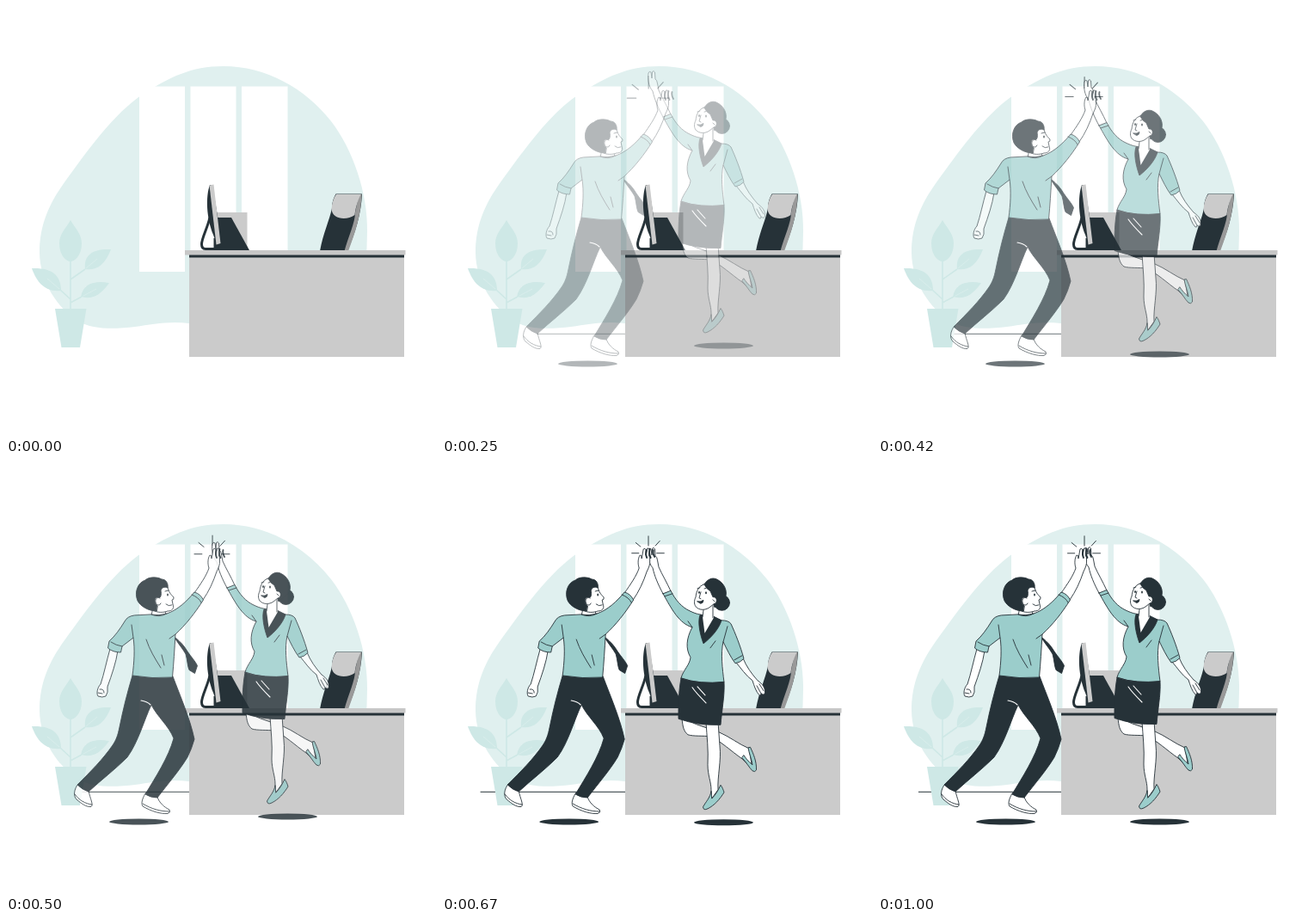
These frames come from a looping animation (500x500 px, 1.04 s). An HTML page:

```html
<!DOCTYPE html>
<html lang="en">
<head>
<meta charset="utf-8">
<title>High five at the office</title>
<style>
  html, body { margin: 0; width: 100%; height: 100%; overflow: hidden; background: #fff; }
  svg { display: block; width: 100vw; height: 100vh; }
  .blob { fill: #e0f0ef; }
  .plant { fill: #cee8e6; }
  .stem { fill: none; stroke: #cee8e6; stroke-width: 1.6; }
  .vein { fill: none; stroke: #e0f0ef; stroke-width: .6; }
  .grey { fill: #cbcbcb; }
  .dark { fill: #263238; }
  .white { fill: #fff; }
  .figure { stroke: #263238; stroke-width: .9; stroke-linejoin: round; stroke-linecap: round; }
  .skin { fill: #fff; }
  .teal { fill: #9bcdcb; }
  .line { fill: none; }
  .shine { fill: none; stroke: #fff; stroke-width: 1.1; }
  .plain { stroke: none; }
</style>
</head>
<body>
<svg viewBox="0 0 500 500">
  <!-- room -->
  <path class="blob" d="M253 70C302 70 347 95 378 134C403 166 421 218 420 262L419 300L213 369C190 366 170 370 150 373C125 376 100 376 85 367C60 352 39 320 39 286C39 255 50 230 68 205C95 168 125 125 160 102C190 83 215 70 253 70Z"/>
  <path class="white" d="M155 93.500h53v215.500h-53zM214.500 93.500h53v215.500h-53zM274 93.500h53.500v215.500h-53.500z"/>
  <line id="floor" y1="381.300" x2="213" y2="381.300" stroke="#263238"/>

  <!-- plant -->
  <path class="stem" d="M75 352V290M92 306L75 318M63 330L75 341M88 338L75 345"/>
  <g class="plant">
    <path d="M57 352H93.500L86 397H64.500Z"/>
    <path d="M75 249C80 258 88 265 88 276C88 290 80 297 75 297C70 297 62 290 62 276C62 265 70 258 75 249Z"/>
    <path d="M122 283C115 302 104 308 92 306C90 290 100 282 122 283Z"/>
    <path d="M30 305C52 304 64 312 64 331C46 333 36 322 30 305Z"/>
    <path d="M120 322C108 339 98 341 87 338C90 322 104 319 120 322Z"/>
  </g>
  <path class="vein" d="M93 305L106 294M62 329L48 317M90 337L105 329"/>

  <!-- chair -->
  <path class="dark" d="M383.500 218.500H414C413 242 406 264 397 285H365C369 263 376 250 379 235C379 228 381 223 383.500 218.500Z"/>
  <path fill="#999" d="M413.500 219C413 242 406 264 398 285H393.500C398 268 406 252 406 240L410.500 219Z"/>
  <path class="grey" d="M384 219H412.500C408 228 406 238 405.500 243C396 250 379 248 378.500 236C379 229 381 223 384 219Z"/>

  <!-- computer -->
  <path class="grey" d="M245 240H280.500V284H245Z"/>
  <path class="dark" d="M246 246H262L283 284H242Z"/>
  <path d="M237 246C234 259 227.500 270 227.500 277Q227.500 282.500 232 282.500H243V270" fill="none" stroke="#263238" stroke-width="3"/>
  <path class="dark" d="M237 208C232 222 233 246 241 266L245 277L247 250L240 208Z"/>
  <path class="grey" d="M236.500 208.500L241.500 207.500L249.500 276L244.500 277.500Z"/>

  <!-- desk -->
  <path class="grey" d="M213 289H463V408H213Z"/>
  <path fill="#c7c7c7" d="M208 284H464.500V289.500H208Z"/>
  <path class="dark" d="M213 289.500H463V292.500H213Z"/>

  <g id="sparks" class="figure">
    <path class="line" d="M240 84V95M225.500 91.500L231 96M221 103.500H229M248 95L253 89.500M249.500 103.500H258"/>
  </g>

  <g id="woman" class="figure">
    <ellipse class="dark plain" cx="327.500" cy="417" rx="34.500" ry="3.500"/>
    <!-- legs -->
    <path class="skin" d="M279 296C280 306 281 311 286 315C292 317 304 316 312 317C325 323 336 334 349 343L361 355L357 331C345 326 334 317 322 312L296 303Z"/>
    <path class="teal" d="M349 342C354 347 357 353 361 357Q364 359 365.500 356C366 346 362 337 358.500 329.500L356 330C357 337 360 343 361 350C356 346 353 342 351 339Z"/>
    <path class="skin" d="M307 300C308 318 310 332 309 350C309 362 313 370 313 379L313 390L321 379C320 364 325 345 323 328L321 300Z"/>
    <path class="teal" d="M313 381C312 388 306 394 303.500 399Q304 403.500 309 401C317 397 323 390 328 382C327 379 326 376 324 373.500C321 380 318 385 314 389Z"/>
    <!-- raised arm -->
    <path class="skin" d="M257 151C251 140 247 130 245 121C240 115 239 107 240 100Q241 97 243 99L244 106L244.500 98.500Q246 96.500 247.500 99L248 107Q250 108 250.500 112L252 120C256 129 261 137 266 148Z"/>
    <!-- lowered arm -->
    <path class="skin" d="M342 231C348 238 353 246 361 252C363 258 365 265 369 269Q371 270 371 267Q375 270 375.500 266C376 261 373 256 367 252C360 244 354 236 350 226Z"/>
    <path class="line" d="M366 258L371 267M369 256L374 264"/>
    <!-- blouse -->
    <path class="teal" d="M257 151L266 147.500C271 158 279 167 288 171C296 175 300 175 304 176L325 182Q333 182 336 186C341 197 347 212 351 226.500Q347 231 341 232C335 224 331 215 327 207C324 220 326 238 328 254Q300 257 278 249C281 239 288 234 289 225C283 215 284 203 291 190C276 186 267 169 257 151Z"/>
    <path class="line" d="M291 190L286 183M327 207L332 189M259 154L268 151M340 228L349 223M312 214L318 206"/>
    <!-- neck and collar -->
    <path class="dark" d="M300 176C297 184 300 198 304 209C313 202 322 192 325 182L315 177Z"/>
    <path class="skin plain" d="M304 168L303 178L305.500 197L316 179L315 165Z"/>
    <path class="line" d="M304 170L303 178M315 165V179"/>
    <!-- skirt -->
    <path class="dark" d="M278 249.500Q300 256.500 328 253.500C329 269 325 289 324 303.500Q298 304.500 275 296.500C275 280 275 265 278 249.500Z"/>
    <path class="shine" d="M291 260C295 266 301 272 307 278M297 259L306 269"/>
    <!-- head -->
    <circle class="dark" cx="325.500" cy="161.500" r="9"/>
    <path class="dark" d="M303 145C305 137 312 131 319 134C328 138 333 148 329 157L317 167L312 153Z"/>
    <path class="skin" d="M305 140C298 142 296 148 295 155C293 159 293 163 295 166C299 170.500 306 170.500 311 167L316 163C321 162 320 154 315 155L312 148C309 146 306 143 305 140Z"/>
    <path class="line" d="M297 145L300 144M305 145Q308 143 310 146M301 149L299 156L301 157M315 158L317 160"/>
    <ellipse class="dark plain" cx="299" cy="149.500" rx=".9" ry="1.500"/>
    <ellipse class="dark plain" cx="307" cy="150" rx=".9" ry="1.500"/>
    <path class="dark" d="M297 160Q301 161 304 158.500Q304 162 301 162.500Z"/>
  </g>

  <g id="man" class="figure">
    <ellipse class="dark plain" cx="146.500" cy="416" rx="34.500" ry="3.500"/>
    <!-- tie -->
    <path class="dark" d="M188 202C193 210 197 214 201 221C203 228 203 235 205 239.500L211.500 243.500L214.500 234.500C212 229 207 224 203 218C199 211 195 207 189 202Z"/>
    <!-- shoes -->
    <path class="skin" d="M76 372C71 378 70 386 74 390C80 395 85 399 91 398.500C94 396 90 390 88 380Z"/>
    <path class="line" d="M72 384C77 391 84 395 92 396"/>
    <path class="skin" d="M154 383C150 390 149 395 151 398C161 404 172 407 180 406.500Q184 405 182 402C176 399 170 394 168 387Z"/>
    <path class="line" d="M151 395C161 401 171 404 182 404"/>
    <!-- trousers -->
    <path class="dark" d="M139 246C133 266 128 286 124 306C122 316 120 321 116 327C105 343 90 358 75 373Q81 379 88 381C103 367 118 356 133 341C146 323 152 299 161 280C168 294 181 304 187 319C181 341 166 364 154 384Q160 388 168 388C181 371 194 356 203 341Q208 331 211 320C206 296 195 271 186 247Z"/>
    <path class="shine" d="M149 275Q156 276 160 280"/>
    <!-- lowered arm -->
    <path class="skin" d="M113 215C109 229 106 244 102 256C98 260 97 267 99 270Q104 272 108 270Q111 266 110 259C115 245 120 231 122 217Z"/>
    <path class="line" d="M101 262Q106 261 106 266M99 266L104 267"/>
    <!-- raised arm -->
    <path class="skin" d="M211 150C218 140 225 130 228 121C226 115 227 109 229 106Q231 105 231 110L233 99Q235 97 236 100L236 106L237.500 98Q239.500 97 240 100L239.500 107Q241 107 240.500 112C241 117 239 121 237 125C233 137 228 148 221 158Z"/>
    <path class="line" stroke-width="1.800" d="M236.500 100Q235 105 237 109M240.500 99Q239 104 241.500 109M244.500 100Q243.500 104 246 108"/>
    <!-- shirt -->
    <path class="skin" d="M163 167L161 176L178 175L176 168Z"/>
    <path class="teal" d="M161 175Q170 177 179 174C191 170 202 160 211 149Q218 151 221.500 158C212 173 201 187 189 198C188 215 187 232 185.500 248Q162 250 139 246C141 231 142 215 140 202L127 212L125.500 219Q116 219 110.500 214L112 206C119 200 125 191 130 183Q133 177 141 176Z"/>
    <path class="line" d="M140 202L138 187M189 198L182 203M114 207Q120 211 127 212M208 152Q216 155 219 161M155 204C159 216 165 226 172 237M173 222L176 234M161 175Q170 179 179 174"/>
    <!-- head -->
    <path class="skin" d="M171 141L180 143C181 149 184 152 187 155Q187.500 158 185 158L186 163C188 168 185 171 180 171C175 173 168 173 163 170L163 150Z"/>
    <path class="dark" d="M167 171C157 171 148 165 145 159C141 149 145 138 154 135C158 131 168 131 173 134C178 134 181 139 180 144C176 142 173 144 172 147C173 152 172 155 170 156C165 153 163 161 168 165Z"/>
    <path class="skin" d="M171 156C166 153 164 161 168 164Q171 165 172 162"/>
    <path class="line" d="M177 148L181 147M178 163Q181 166 185 164"/>
    <ellipse class="dark plain" cx="180" cy="152" rx=".9" ry="1.500"/>
  </g>
</svg>

<script>
  const LOOP = 1040, STEP = 1000 / 24, LAST = 24;
  // [step, distance from the resting place]
  const slide = [[0, 38], [4, 28], [8, 18], [12, 8], [14, 4], [16, 1.2], [18, .2], [20, 0], [22, .6], [24, 2]];
  const [floor, sparks, woman, man] =
    ["floor", "sparks", "woman", "man"].map(id => document.getElementById(id));

  function lookup(table, k) {
    const i = Math.max(1, table.findIndex(([at]) => at >= k));
    const [a, from] = table[i - 1], [b, to] = table[i];
    return from + (to - from) * (k - a) / (b - a);
  }

  function draw(ms) {
    const k = Math.min(LAST, Math.floor((ms % LOOP + 5) / STEP));
    const d = lookup(slide, k);
    const alpha = Math.min(1, Math.max(0, (k - 1.8) / 12.2));

    for (const part of [floor, sparks, woman, man]) part.setAttribute("opacity", alpha);
    floor.setAttribute("x1", 41 + 3 * d);
    man.setAttribute("transform", `translate(${d} 0)`);
    woman.setAttribute("transform", `translate(0 ${1 - d})`);
    sparks.setAttribute("transform",
      `translate(239.5 92) scale(${1 + d * .0135}) translate(-239.5 -92)`);
  }

  const start = performance.now();
  function tick() {
    draw(performance.now() - start);
    requestAnimationFrame(tick);
  }
  tick();
</script>
</body>
</html>
```
